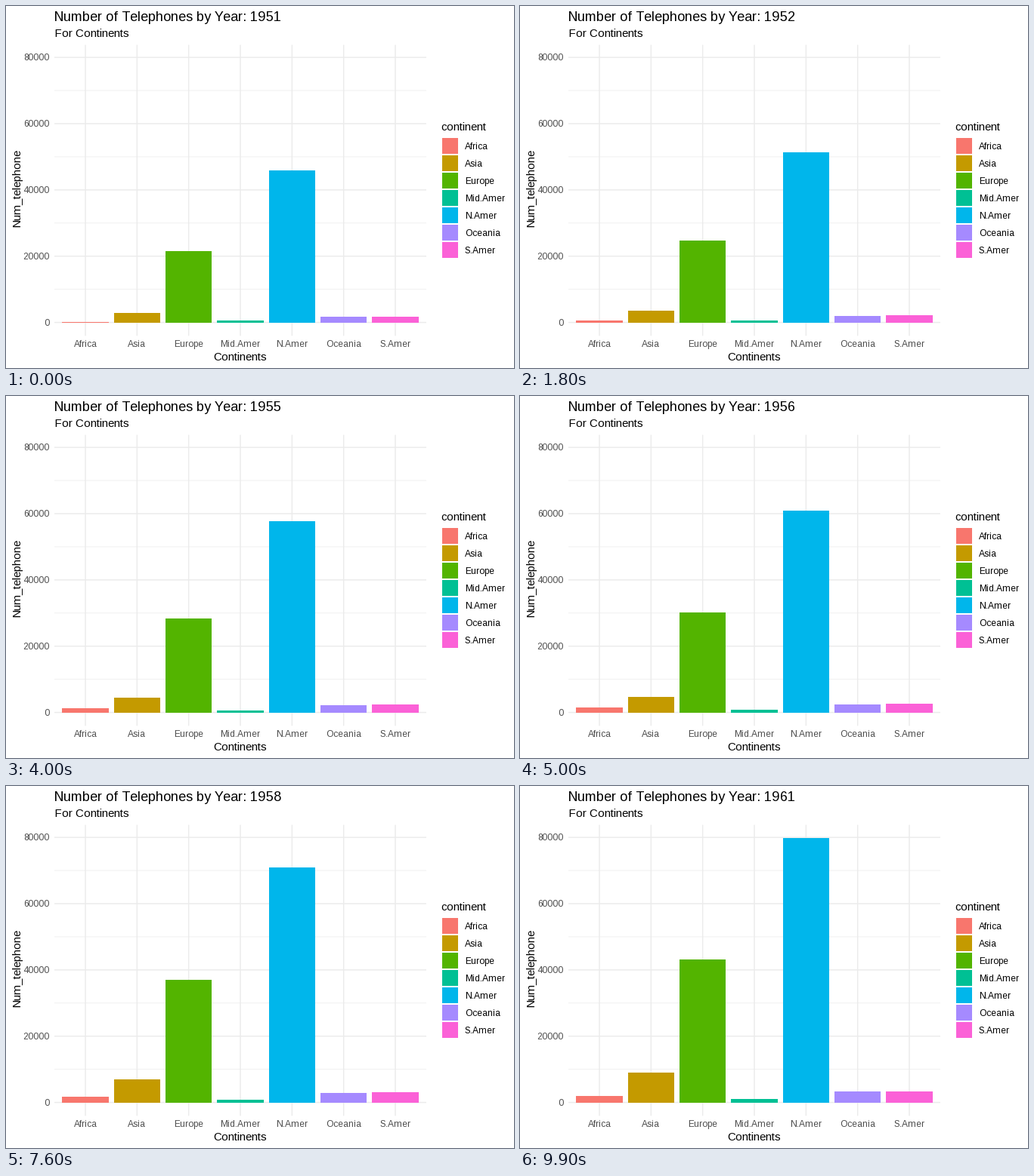
Write a matplotlib script that moves like this. It is 672 by 480 pixels and loops after 10000 ms.

```python
import numpy as np
import matplotlib.pyplot as plt
from matplotlib.animation import FuncAnimation
from matplotlib.patches import Rectangle

plt.rcParams.update({
    "font.family": "Liberation Sans",
    "text.hinting": "force_autohint",
    "text.hinting_factor": 1,
    "text.kerning_factor": 0,
})

W, H, DPI = 672, 480, 96
FRAMES, INTERVAL = 100, 100
LAST = FRAMES - 1

# Colour and count at the start, middle and end of the decade;
# growth is linear in between
CONTINENTS = {
    "Africa": ("#F8766D", 89, 1411, 2005),
    "Asia": ("#C49A00", 2876, 4708, 9053),
    "Europe": ("#53B400", 21574, 29990, 43173),
    "Mid.Amer": ("#00C094", 555, 733, 1076),
    "N.Amer": ("#00B6EB", 45939, 60423, 79831),
    "Oceania": ("#A58AFF", 1646, 2366, 3224),
    "S.Amer": ("#FB61D7", 1815, 2568, 3338),
}

# Panel geometry in pixels, y pointing down
LEFT, RIGHT, TOP, BOTTOM = 64, 556, 51.5, 437.3
ZERO, UNIT = 419.6, 87.87 / 20000
STEP = (RIGHT - LEFT) / (len(CONTINENTS) + 0.2)
BASE = round(ZERO)
GRID, AXIS_TEXT = "#EBEBEB", "#4D4D4D"
MAJOR, MINOR = 1.42, 0.71
TITLE, BODY, SMALL = 13.2, 11, 8.8

fig = plt.figure(figsize=(W / DPI, H / DPI), dpi=DPI, facecolor="white")
ax = fig.add_axes([0, 0, 1, 1])
ax.set_xlim(0, W)
ax.set_ylim(H, 0)
ax.axis("off")


def y_px(value):
    return ZERO - value * UNIT


def line(xs, ys, width):
    ax.plot(xs, ys, color=GRID, lw=width * 72 / DPI, snap=False,
            solid_capstyle="butt", zorder=1)


def label(x, y, text, size=BODY, color="black", **kw):
    return ax.text(x, y, text, size=size, color=color, va="baseline", **kw)


def box(x, y, w, h, color):
    return ax.add_patch(Rectangle((x, y), w, h, fc=color, lw=0, zorder=2))


for value in range(0, 80001, 10000):
    y = y_px(value)
    major = value % 20000 == 0
    line([LEFT, RIGHT], [y, y], MAJOR if major else MINOR)
    if major:
        label(57.4, round(y + 4.3), str(value), SMALL, AXIS_TEXT, ha="right")

title = label(LEFT, 20, "", TITLE)
label(LEFT, 41, "For Continents")
label(310, 470, "Continents", ha="center")
label(18, 241, "Num_telephone", rotation=90, ha="center", rotation_mode="anchor")
label(575, 165, "continent")

bars = []
for k, (name, (color, *counts)) in enumerate(CONTINENTS.items()):
    x = LEFT + STEP * (0.6 + k)
    line([x, x], [TOP, BOTTOM], MAJOR)
    label(x, 452, name, SMALL, AXIS_TEXT, ha="center")

    x0, x1 = round(x - 0.45 * STEP), round(x + 0.45 * STEP)
    bars.append((box(x0, BASE, x1 - x0, 0, color), counts))

    dy = round(23.04 * k)
    box(577, 175 + dy, 21, 21, color)
    label(607, 190 + dy, name, SMALL)


def update(i):
    title.set_text(f"Number of Telephones by Year: {1951 + 10 * i // LAST}")
    for bar, counts in bars:
        top = round(y_px(np.interp(i, [0, LAST // 2, LAST], counts)))
        bar.set_y(top)
        bar.set_height(BASE - top)
    return [title, *(bar for bar, _ in bars)]


anim = FuncAnimation(fig, update, frames=FRAMES, interval=INTERVAL,
                     init_func=lambda: update(0), repeat=True, repeat_delay=0)
plt.show()
```
